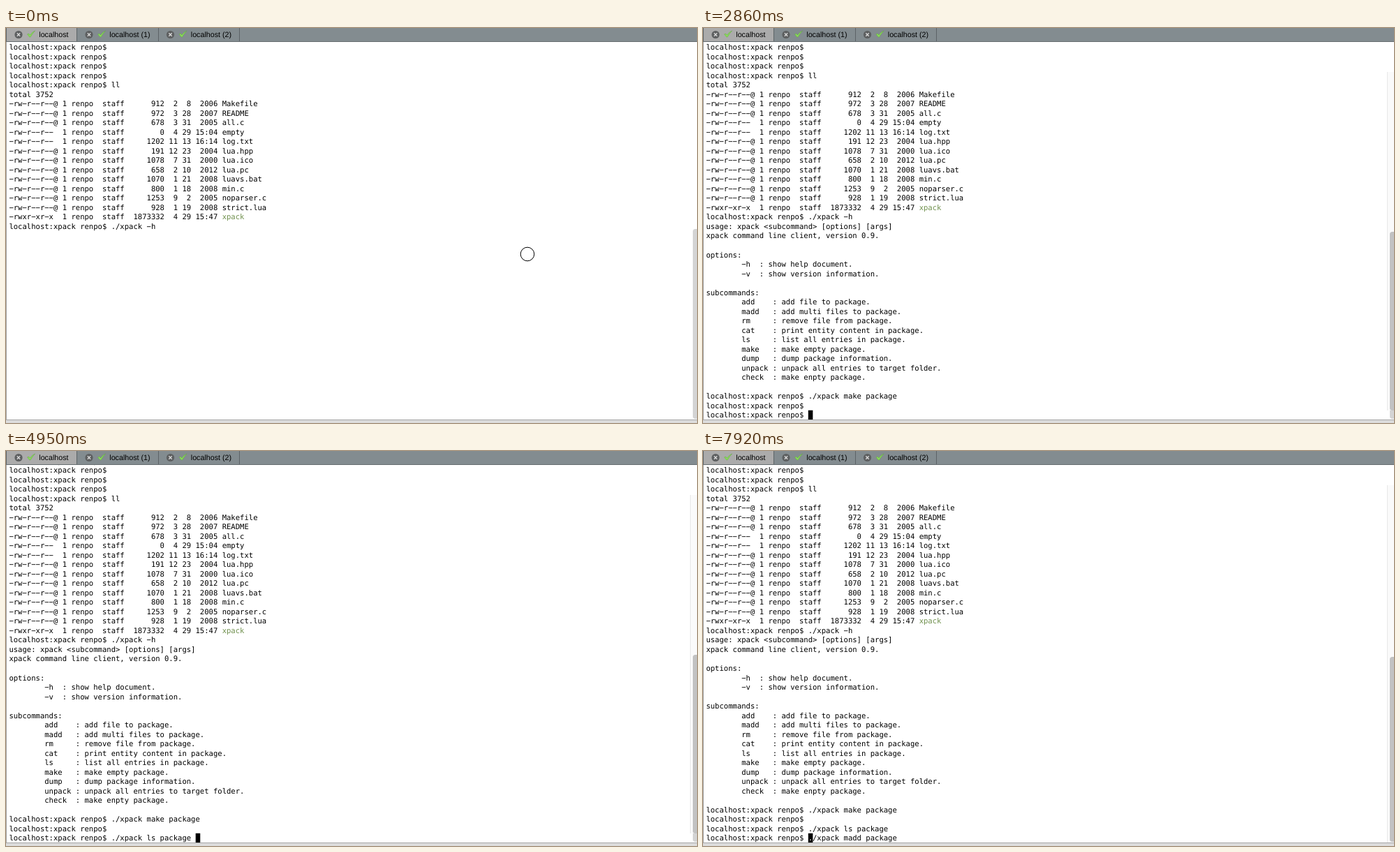
Recreate the animation shown at these times as an HTML page. Size 990x566 px, loop 8000 ms.

```html
<!DOCTYPE html>
<html lang="en">
<head>
<meta charset="utf-8">
<title>Terminal session</title>
<style>
html, body { margin: 0; width: 100%; height: 100%; overflow: hidden; background: #fff; }
svg { display: block; }
text { white-space: pre; text-rendering: geometricPrecision; }
.term { font: 10.57px "DejaVu Sans Mono", Menlo, monospace; }
.tab { font: 10.7px "Liberation Sans", Arial, sans-serif; }
</style>
</head>
<body>
<svg id="stage" width="990" height="566" viewBox="0 0 990 566"></svg>
<script>
const LOOP = 8000, STEP = 110;
const LEFT = 4.4, TOP = 20.9, ROW = 13.51, COL = 6.364, ASCENT = 10.4;
const PROMPT = 'localhost:xpack renpo$ ';
const stage = document.getElementById('stage');

function add(parent, tag, attrs, content) {
  const node = document.createElementNS('http://www.w3.org/2000/svg', tag);
  for (const key in attrs) node.setAttribute(key, attrs[key]);
  if (content !== undefined) node.textContent = content;
  parent.appendChild(node);
  return node;
}
const rect = (parent, x, y, width, height, fill, rx = 0) =>
  add(parent, 'rect', { x, y, width, height, fill, rx });
const show = (node, on) => node.setAttribute('visibility', on ? 'visible' : 'hidden');

// The terminal face draws its hyphen as wide as a minus sign.
const dash = s => s.replaceAll('-', '\u2212');
const baseline = row => TOP + row * ROW + ASCENT;

const files = `-rw-r--r--@|912|2|8|2006|Makefile
-rw-r--r--@|972|3|28|2007|README
-rw-r--r--@|678|3|31|2005|all.c
-rw-r--r--|0|4|29|15:04|empty
-rw-r--r--|1202|11|13|16:14|log.txt
-rw-r--r--@|191|12|23|2004|lua.hpp
-rw-r--r--@|1078|7|31|2000|lua.ico
-rw-r--r--@|658|2|10|2012|lua.pc
-rw-r--r--@|1070|1|21|2008|luavs.bat
-rw-r--r--@|800|1|18|2008|min.c
-rw-r--r--@|1253|9|2|2005|noparser.c
-rw-r--r--@|928|1|19|2008|strict.lua
-rwxr-xr-x|1873332|4|29|15:47|xpack`.split('\n').map(line => {
  const [mode, size, month, day, year, name] = line.split('|');
  const info = [mode.padEnd(11), '1 renpo  staff ', size.padStart(7), month.padStart(2),
    day.padStart(2), year.padStart(5)].join(' ') + ' ';
  return { info, name };
});

const help = `usage: xpack <subcommand> [options] [args]
xpack command line client, version 0.9.

options:
        -h  : show help document.
        -v  : show version information.

subcommands:
        add    : add file to package.
        madd   : add multi files to package.
        rm     : remove file from package.
        cat    : print entity content in package.
        ls     : list all entries in package.
        make   : make empty package.
        dump   : dump package information.
        unpack : unpack all entries to target folder.
        check  : make enpty package.
`.split('\n');

rect(stage, 0, 0, 990, 566, '#fff');

// Terminal text
const screen = add(stage, 'g', { class: 'term' });
let rows = 0;
function print(parent, content) {
  return add(parent, 'text', { x: LEFT, y: baseline(rows++) }, dash(content));
}
for (let i = 0; i < 4; i++) print(screen, PROMPT);
print(screen, PROMPT + 'll');
print(screen, 'total 3752');
for (const { info, name } of files) {
  const line = print(screen, info);
  add(line, 'tspan', name === 'xpack' ? { fill: '#71914f' } : {}, name);
}
print(screen, PROMPT + './xpack -h');
const helpText = add(screen, 'g');
help.forEach(line => print(helpText, line));

// keys: [step, characters typed]
const commands = [
  { from: 2, text: './xpack make package', keys: [[4, 0], [8, 4], [16, 13], [23, 20]] },
  { from: 25, text: '', keys: [[25, 0]] },
  { from: 26, text: './xpack ls package ', keys: [[28, 0], [32, 4], [40, 14], [45, 19]] },
  { from: 46, text: './xpack madd package', keys: [[47, 0], [55, 8], [56, 8], [68, 20]] }
];
for (const c of commands) {
  c.row = rows;
  c.node = print(screen, PROMPT);
}

function typed(keys, step) {
  if (step <= keys[0][0]) return keys[0][1];
  for (let i = 1; i < keys.length; i++) {
    const [a, from] = keys[i - 1], [b, to] = keys[i];
    if (step <= b) return Math.floor(from + (to - from) * (step - a) / (b - a));
  }
  return keys[keys.length - 1][1];
}

const cursor = add(screen, 'g');
rect(cursor, 0, 0, COL + 0.2, 13.2, '#000');
const cursorChar = add(cursor, 'text', { x: 0, y: ASCENT, fill: '#fff' });
const cursorOn = [[2, 4], [12, 16], [25, 29], [34, 37], [42, 47], [54, 56], [69, 72]];
const HOME_STEP = 72;

const pointer = add(stage, 'circle',
  { cx: 747, cy: 324, r: 9.8, fill: '#fff', stroke: '#000', 'stroke-width': 1 });

// Scroll bar, one look per scrolled row
const bars = [0, 1, 2].map(() => add(stage, 'g'));
rect(bars[0], 984, 288, 10, 272, '#d4d4d4', 3.5);
[[63, 548, 292], [49, 561, 295]].forEach(([top, bottom, thumb], i) => {
  const bar = bars[i + 1];
  if (i === 0) rect(bar, 984, 500, 10, 60, '#d4d4d4', 3.5);
  rect(bar, 980, top, 10, bottom - top, '#fafafa');
  rect(bar, 980, top, 1, bottom - top, '#e8e8e8');
  rect(bar, 984, thumb, 10, Math.min(bottom, 560) - thumb, '#c2c2c2', 3.5);
});

// Window frame
rect(stage, 0, 20, 1, 542, '#a0a0a0');
rect(stage, 0, 561, 990, 5, '#dcdcdc');
rect(stage, 0, 561, 990, 1, '#a6a6a6');

// Tab bar
rect(stage, 0, 0, 990, 20, '#838c90');
rect(stage, 0, 0, 101, 19, '#ababab');
rect(stage, 0, 19, 990, 1, '#666d70');
for (const x of [0, 101, 218, 334]) rect(stage, x, 0, 1, 19, '#5c6366');
[[18, 'localhost'], [119, 'localhost (1)'], [235.5, 'localhost (2)']].forEach(([x, label]) => {
  const tab = add(stage, 'g', { transform: `translate(${x} 9.5)` });
  add(tab, 'circle', { r: 5.6, fill: '#5d5f60' });
  add(tab, 'path', { d: 'M-2.2-2.2L2.2 2.2M2.2-2.2L-2.2 2.2', stroke: '#d8d8d8', 'stroke-width': 1.4 });
  add(tab, 'path', { d: 'M12.6-.6L14.6-1.4L16.4.7Q19.2-3.8 23.6-5.6Q19.8-1.6 17 3.4L15.8 3.4Z',
    fill: '#8be05a', stroke: '#5fa53c', 'stroke-width': 0.5 });
  add(tab, 'text', { class: 'tab', x: 29.3, y: 3.8 }, label);
});

function draw(time) {
  const step = Math.floor(time % LOOP / STEP);
  const scroll = step < 26 ? 0 : step < 46 ? 1 : 2;
  screen.setAttribute('transform', `translate(0 ${-scroll * ROW})`);
  bars.forEach((bar, i) => show(bar, i === scroll));
  show(pointer, step < 2);
  show(helpText, step >= 2);

  let active = null;
  for (const c of commands) {
    const on = step >= c.from;
    show(c.node, on);
    if (!on) continue;
    c.count = typed(c.keys, step);
    c.node.textContent = PROMPT + c.text.slice(0, c.count);
    active = c;
  }

  const blink = active && cursorOn.some(([a, b]) => step >= a && step <= b);
  show(cursor, blink);
  if (blink) {
    const col = step === HOME_STEP ? 0 : active.count;
    const x = LEFT + (PROMPT.length + col) * COL, y = TOP + active.row * ROW;
    cursor.setAttribute('transform', `translate(${x} ${y})`);
    cursorChar.textContent = active.text.slice(col, Math.min(col + 1, active.count));
  }
}

const start = performance.now();
function tick() {
  draw(performance.now() - start);
  requestAnimationFrame(tick);
}
tick();
</script>
</body>
</html>
```
